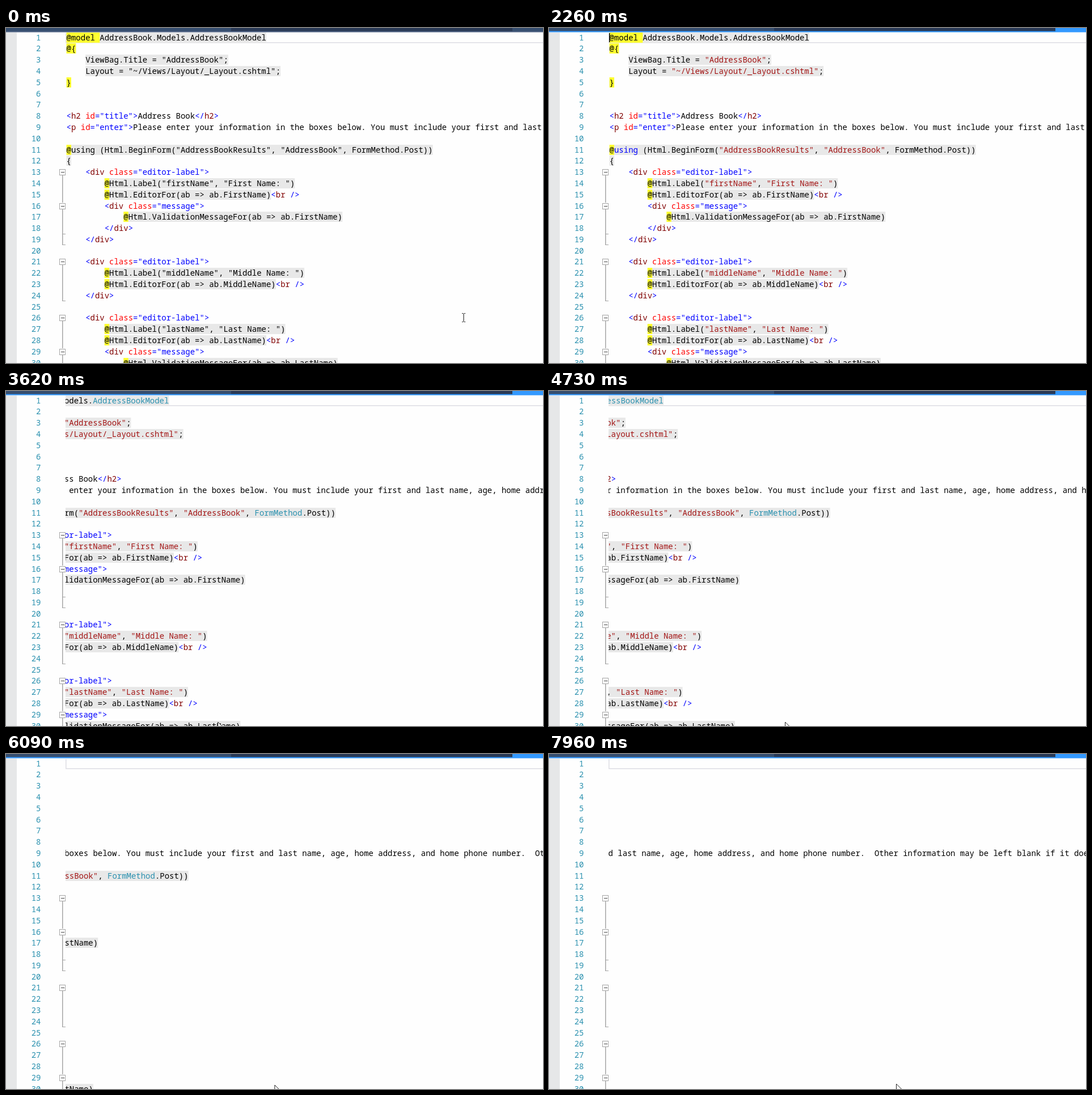
These frames come from a looping animation (947x591 px, 8 s). An HTML page with a canvas:

```html
<!DOCTYPE html>
<html lang="en">
<head>
<meta charset="utf-8">
<title>Code editor scrolling sideways</title>
<style>
html, body { margin: 0; width: 100%; height: 100%; overflow: hidden; background: #fefefe; }
canvas { display: block; }
</style>
</head>
<body>
<canvas id="stage" width="947" height="591"></canvas>
<script>
const ctx = document.getElementById('stage').getContext('2d');
const LOOP = 8000, CHAR = 8.39, ROW = 19.79, LEFT = 106.6, EDGE = 105;
const FOCUS = 2140, COLOURED = 2260, TYPES_COLOURED = 2510;
const BLUE = '#0000ff', MAROON = '#800000', RED = '#ff0000', STRING = '#a31515', TEAL = '#2b91af';

const lines = `@model AddressBook.Models.AddressBookModel
@{
    ViewBag.Title = "AddressBook";
    Layout = "~/Views/Layout/_Layout.cshtml";
}


<h2 id="title">Address Book</h2>
<p id="enter">Please enter your information in the boxes below. You must include your first and last name, age, home address, and home phone number.  Other information may be left blank if it does not apply to you.</p>

@using (Html.BeginForm("AddressBookResults", "AddressBook", FormMethod.Post))
{
    <div class="editor-label">
        @Html.Label("firstName", "First Name: ")
        @Html.EditorFor(ab => ab.FirstName)<br />
        <div class="message">
            @Html.ValidationMessageFor(ab => ab.FirstName)
        </div>
    </div>

    <div class="editor-label">
        @Html.Label("middleName", "Middle Name: ")
        @Html.EditorFor(ab => ab.MiddleName)<br />
    </div>

    <div class="editor-label">
        @Html.Label("lastName", "Last Name: ")
        @Html.EditorFor(ab => ab.LastName)<br />
        <div class="message">
            @Html.ValidationMessageFor(ab => ab.LastName)`.split('\n');

// [time, x, y] of the text pointer
const beam = [[0, 807, 511], [500, 808, 515], [1130, 574, 492], [1280, 530, 516], [1400, 482, 544], [1520, 482, 640]];
// [time, scroll, optional pointer x]
const scrolls = [[0, 0], [2510, 43], [2630, 86], [3500, 129], [3620, 171.5], [3990, 193], [4110, 214],
  [4730, 257, 416], [4850, 285], [5350, 320], [5470, 352], [5590, 385], [6090, 431], [6210, 468], [6330, 505],
  [6580, 545], [6700, 584], [6950, 622], [7320, 660], [7440, 692], [7560, 722], [7840, 756], [7960, 790]];

const stepAt = (steps, t) => steps.filter(s => s[0] <= t).pop();
const rowY = n => 16.7 + n * ROW;

function rect(colour, x, y, w, h) {
  ctx.fillStyle = colour;
  ctx.fillRect(x, y, w, h);
}

function tagColour(word, i) {
  if (/^[<>\/="]/.test(word)) return BLUE;
  return i < 2 ? MAROON : RED;
}

function codeColour(word, t) {
  if (word[0] === '"' && t >= COLOURED) return STRING;
  if (word === 'using' && t >= COLOURED) return BLUE;
  if (/^(AddressBookModel|FormMethod)$/.test(word) && t >= TYPES_COLOURED) return TEAL;
  return '#000';
}

function drawLine(line, n, t, scroll) {
  const y = Math.round(rowY(n));
  let col = 0, sawTag = false;
  const x = c => LEFT + c * CHAR - scroll;
  const write = (word, colour) => {
    ctx.fillStyle = colour;
    ctx.fillText(word, x(col), y + 5);
    col += word.length;
  };
  for (const part of line.match(/<[^>]+>|[^<]+/g) || []) {
    if (part[0] === '<') {
      part.match(/<\/?|=?"[^"]*"|\/?>|\s+|[\w-]+/g).forEach((w, i) => write(w, tagColour(w, i)));
      sawTag = true;
    } else if (sawTag) {
      write(part, '#000');
    } else {
      const code = part.trimStart();
      col += part.length - code.length;
      if (!code) continue;
      const mark = (code.match(/^(@model |@\{|\}|@)/) || [''])[0].length;
      rect('#e8e8e8', x(col), y - 9, code.length * CHAR, 18);
      rect('#ffff30', x(col), y - 9, mark * CHAR, 18);
      code.match(/"[^"]*"|\w+|[^\w"]+/g).forEach(w => write(w, codeColour(w, t)));
    }
  }
}

function drawFolds() {
  const grey = '#a5a5a5';
  const stem = (from, to) => rect(grey, 99, from, 1.5, to - from);
  [[260, 308], [320, 383], [418, 482], [517, 565], [577, 591]].forEach(s => stem(...s));
  [363, 382, 481].forEach(y => rect(grey, 99, y, 6, 1));
  ctx.lineWidth = 1;
  for (const n of [12, 15, 20, 25, 28]) {
    const y = Math.round(rowY(n));
    rect('#fff', 94, y - 5, 11, 11);
    ctx.strokeStyle = grey;
    ctx.strokeRect(94.5, y - 4.5, 10, 10);
    rect('#444', 97, y, 6, 1);
  }
}

function drawFrame(t) {
  const active = t >= FOCUS;
  rect('#fefefe', 0, 0, 947, 591);
  rect('#e6e7e8', 0, 8, 19, 583);
  rect('#364e6f', 0, 0, 397, 6);
  rect('#293955', 397, 0, 496, 6);
  rect(active ? '#3399ff' : '#364e6f', 893, 0, 54, 6);
  rect(active ? '#3399ff' : '#4d6082', 0, 5.5, 947, 2);

  ctx.font = '13.98px "Noto Sans Mono", "DejaVu Sans Mono", monospace';
  ctx.textAlign = 'right';
  ctx.fillStyle = TEAL;
  lines.forEach((_, n) => ctx.fillText(n + 1, 61.5, Math.round(rowY(n)) + 5));
  ctx.textAlign = 'left';

  const [, scroll, pointerX = 307 + scroll / 2.59] = stepAt(scrolls, t);
  ctx.save();
  ctx.beginPath();
  ctx.rect(EDGE, 8, 947 - EDGE, 583);
  ctx.clip();
  rect('#dedee4', EDGE, 25, 842, 1.5);
  rect('#dedee4', EDGE, 9, 1.5, 17);
  lines.forEach((line, n) => drawLine(line, n, t, scroll));
  if (active && !scroll) rect('#000', 106, 9, 1.5, 16);
  ctx.restore();
  drawFolds();

  if (scroll) drawArrow(pointerX, t >= 7840 ? 582 : 584);
  else drawBeam(stepAt(beam, t));
}

function drawBeam([, x, y]) {
  rect('#333', x - 0.5, y - 7, 1.2, 14);
  for (const end of [y - 8, y + 7]) {
    rect('#333', x - 3, end, 2.5, 1);
    rect('#333', x + 0.7, end, 2.5, 1);
  }
}

function drawArrow(x, y) {
  ctx.beginPath();
  [[0, 0], [0, 16], [4, 12.5], [7, 19], [9.5, 18], [6.5, 11.5], [11.5, 11.5]]
    .forEach(([dx, dy]) => ctx.lineTo(x + dx + 0.5, y + dy));
  ctx.closePath();
  ctx.fillStyle = '#fff';
  ctx.fill();
  ctx.strokeStyle = '#222';
  ctx.stroke();
}

const start = performance.now();
function tick() {
  drawFrame((performance.now() - start) % LOOP);
  requestAnimationFrame(tick);
}
tick();
</script>
</body>
</html>
```
